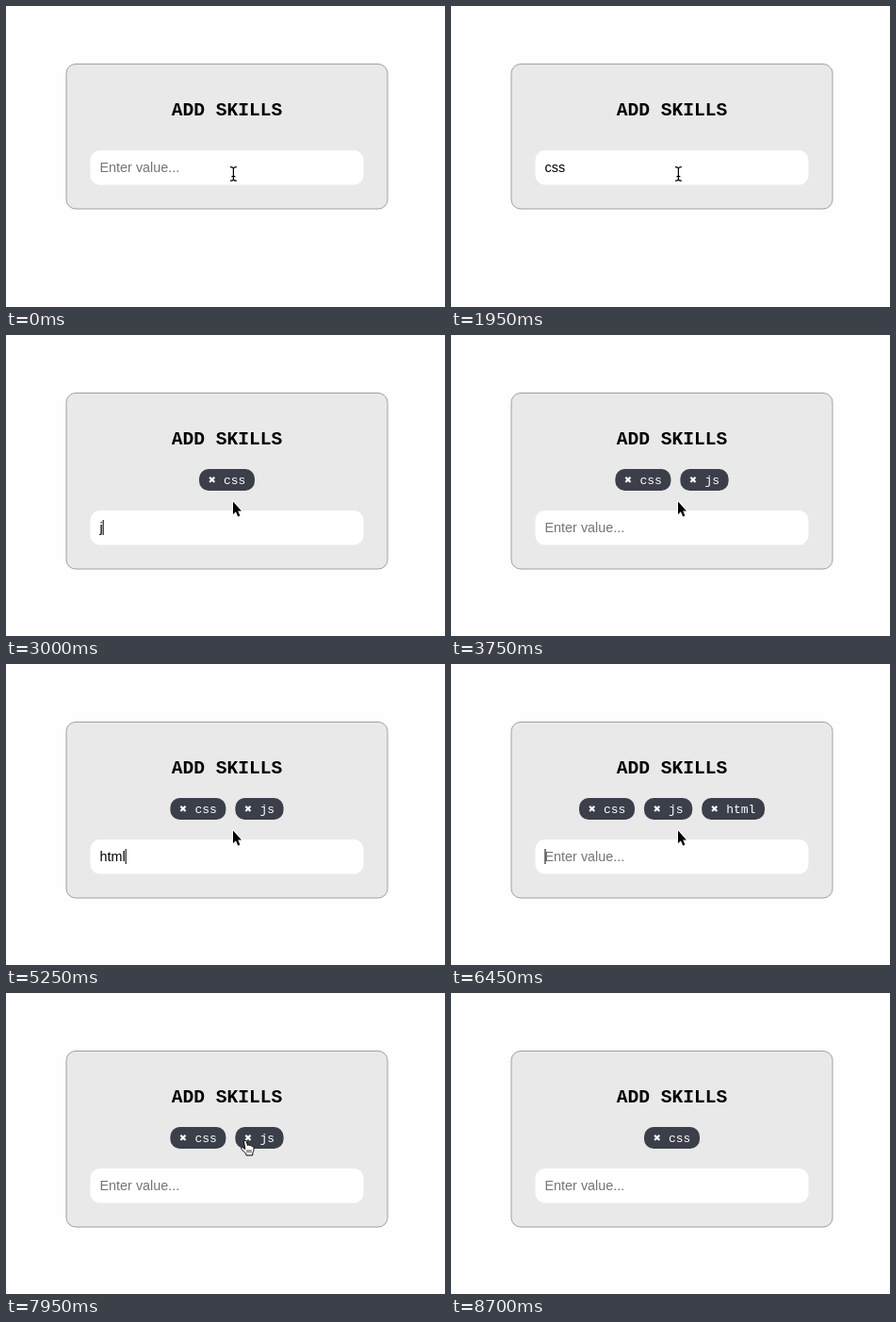
Animation, 466 px wide and 319 px high, one loop 8.85 s. Source, as an HTML page:

```html
<!DOCTYPE html>
<html lang="en">
<head>
<meta charset="utf-8">
<title>Add skills</title>
<style>
  html, body { margin: 0; width: 100%; height: 100%; overflow: hidden; background: #fefefe; }
  svg { display: block; }
  .title, .tag { font-family: "Courier New", "Liberation Mono", monospace; }
  .title { font-size: 19.6px; font-weight: bold; text-anchor: middle; }
  .tag { font-size: 13px; fill: #fff; }
  .cross { font: 10px "DejaVu Sans", sans-serif; fill: #fff; text-anchor: middle; }
  .value { font: 14.4px Arial, "Liberation Sans", sans-serif; }
  .outlined { stroke: #fff; stroke-width: 2; stroke-linejoin: round; paint-order: stroke; }
</style>
</head>
<body>
<svg width="466" height="319" viewBox="0 0 466 319">
  <defs>
    <path id="beam" d="M-3 -7Q0 -7 0 -5Q0 -7 3 -7M0 -5V5.5M-3 7.5Q0 7.5 0 5.5Q0 7.5 3 7.5M-1.5 3H1.5"/>
  </defs>
  <rect id="panel" x="64" y="61.5" width="341" rx="10" fill="#e9e9e9" stroke="#a0a0a0"/>
  <text class="title" x="234.5" y="115.8">ADD SKILLS</text>
  <g id="tags"></g>
  <g id="field">
    <rect x="89.5" y="153" width="290" height="36.5" rx="10" fill="#fff"/>
    <text id="value" class="value" x="99.5" y="176.3"></text>
    <rect id="caret" y="163" width="1.2" height="16" fill="#222"/>
  </g>
  <g id="ibeam" fill="none" stroke-linecap="round">
    <use href="#beam" stroke="#fff" stroke-width="2.6"/>
    <use href="#beam" stroke="#000" stroke-width="1.2"/>
  </g>
  <path id="arrow" class="outlined" d="M1 1.5V15L4 12.2L6.2 17.5L8.4 16.5L6.2 11.4H10Z"/>
  <g id="hand" stroke="#000" stroke-linejoin="round" stroke-linecap="round">
    <path fill="#fff" d="M-1.4 .3C-1 -1 1 -1 1.4 .4L2.4 4.4C3.2 3.8 4.3 4 4.8 4.8C5.8 4.3 6.8 4.8 7 5.6C8.2 5.3 9 6 9 7.1C9.2 9.8 8.6 11.3 7.8 12.8V15H1V13.6C-.5 12.3 -2.4 10.3 -4 8.4C-4.8 7.2 -3.5 6.2 -2.4 6.8L-.4 8.3Z"/>
    <path fill="none" stroke-width=".8" d="M2 9.5V12M4 9.5V12M6 9.5V12"/>
  </g>
</svg>
<script>
const LOOP = 8850, STEP = 150, CENTER = 234.5, CHAR = 7.8, GAP = 10, ROW = 33;
const $ = id => document.getElementById(id);

// [start ms, typed text, caret visible]
const typing = [
  [0, '', 0], [150, '', 1], [750, '', 0], [900, 'c', 1], [1200, 'cs', 1], [1500, 'css', 1], [1950, 'css', 0],
  [2100, '', 0], [2400, '', 1], [3000, 'j', 1], [3150, 'js', 1],
  [3750, '', 0], [4200, '', 1], [4650, 'h', 1], [4950, 'ht', 1], [5100, 'htm', 1], [5250, 'html', 1], [5700, 'html', 0],
  [5850, '', 0], [6150, '', 1], [6750, '', 0]
];
// [start ms, skills]
const skills = [
  [0, []], [2100, ['css']], [3750, ['css', 'js']], [5850, ['css', 'js', 'html']],
  [7200, ['css', 'js']], [8100, ['css']]
];
// [start ms, shape, x, y, easing power towards the next point, 0 to rest]
const pointer = [
  [0, 'ibeam', 241.4, 177.7, 0], [2100, 'arrow', 240, 175, 0], [6450, 'arrow', 240, 175, 1],
  [6900, 'hand', 276, 153, 0], [7200, 'arrow', 275, 153, 1], [7800, 'hand', 254, 157, 0],
  [8100, 'arrow', 251, 155, 1.7], [8700, 'none', 560, 385, 0]
];

const indexAt = (list, t) => list.findLastIndex(entry => entry[0] <= t);

function drawTags(names) {
  const widths = names.map(name => 35.6 + CHAR * name.length);
  const total = widths.reduce((sum, w) => sum + w + GAP, -GAP);
  let x = CENTER - total / 2;
  $('tags').innerHTML = names.map((name, i) => {
    const tag = `<rect x="${x}" y="142" width="${widths[i]}" height="23" rx="10" fill="#3b3f49"/>
      <text class="cross" x="${x + 13.6}" y="157">✖</text>
      <text class="tag" x="${x + 26}" y="158">${name}</text>`;
    x += widths[i] + GAP;
    return tag;
  }).join('');
}

function drawField(text, caret, shift) {
  const value = $('value');
  value.textContent = text || 'Enter value...';
  value.setAttribute('fill', text ? '#000' : '#757575');
  $('caret').setAttribute('x', 99.4 + (text ? value.getComputedTextLength() : 0));
  $('caret').setAttribute('opacity', caret);
  $('field').setAttribute('transform', `translate(0 ${shift})`);
  $('panel').setAttribute('height', 153.5 + shift);
}

function drawPointer(t) {
  const i = indexAt(pointer, t);
  const [start, shape, x, y, power] = pointer[i];
  const [end, , nextX, nextY] = pointer[i + 1] || pointer[i];
  const p = power ? ((t - start) / (end - start)) ** power : 0;
  for (const id of ['ibeam', 'arrow', 'hand']) {
    $(id).setAttribute('visibility', id === shape ? 'visible' : 'hidden');
    $(id).setAttribute('transform', `translate(${x + (nextX - x) * p} ${y + (nextY - y) * p})`);
  }
}

let shown = -1;
function frame() {
  const t = Math.floor(performance.now() % LOOP / STEP) * STEP;
  if (t !== shown) {
    shown = t;
    const names = skills[indexAt(skills, t)][1];
    const [, text, caret] = typing[indexAt(typing, t)];
    drawTags(names);
    drawField(text, caret, names.length ? ROW : 0);
    drawPointer(t);
  }
  requestAnimationFrame(frame);
}
frame();
</script>
</body>
</html>
```
